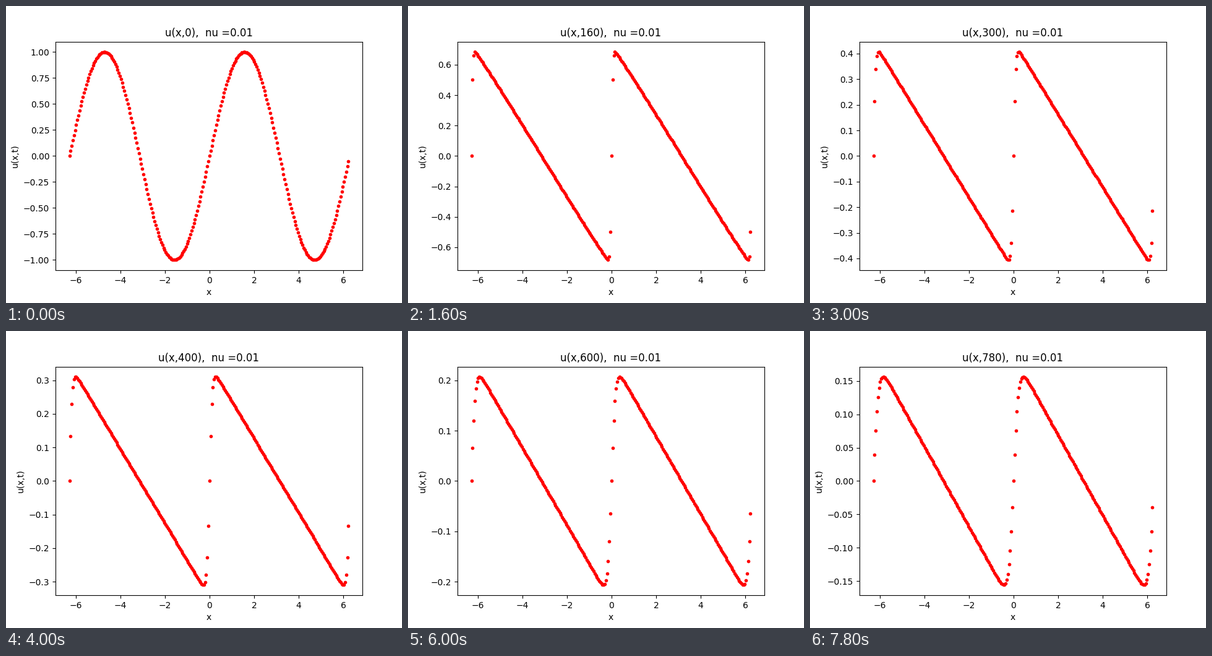
A matplotlib script that plays this animation: 640x480 px, repeating every 8 s.

```python
import numpy as np
import matplotlib.pyplot as plt
from matplotlib.animation import FuncAnimation

POINTS = 250
FRAMES = 40
STEPS_PER_FRAME = 20
DT = 0.02
VISC = 0.0206  # effective viscosity of the wave

x = -2 * np.pi + 4 * np.pi * np.arange(POINTS) / POINTS
s = np.linspace(-8, 8, 2001)


def burgers(t):
    """Cole-Hopf solution of u_t = u u_x + VISC u_xx with u(x, 0) = sin x."""
    if t == 0:
        return np.sin(x)
    g = -np.cos(x[:, None] + s) / (2 * VISC) - s**2 / (4 * VISC * t)
    w = np.exp(g - g.max(axis=1, keepdims=True))
    return (w @ s) / (t * w.sum(axis=1))


fig, ax = plt.subplots(figsize=(6.4, 4.8), dpi=100)


def draw(frame):
    step = frame * STEPS_PER_FRAME
    ax.clear()
    ax.plot(x, burgers(step * DT), "r.")
    ax.set_xlabel("x")
    ax.set_ylabel("u(x,t)")
    ax.set_title(f"u(x,{step}),  nu =0.01")


anim = FuncAnimation(fig, draw, frames=FRAMES, init_func=lambda: None,
                     interval=200, repeat=True, repeat_delay=0)
plt.show()
```
